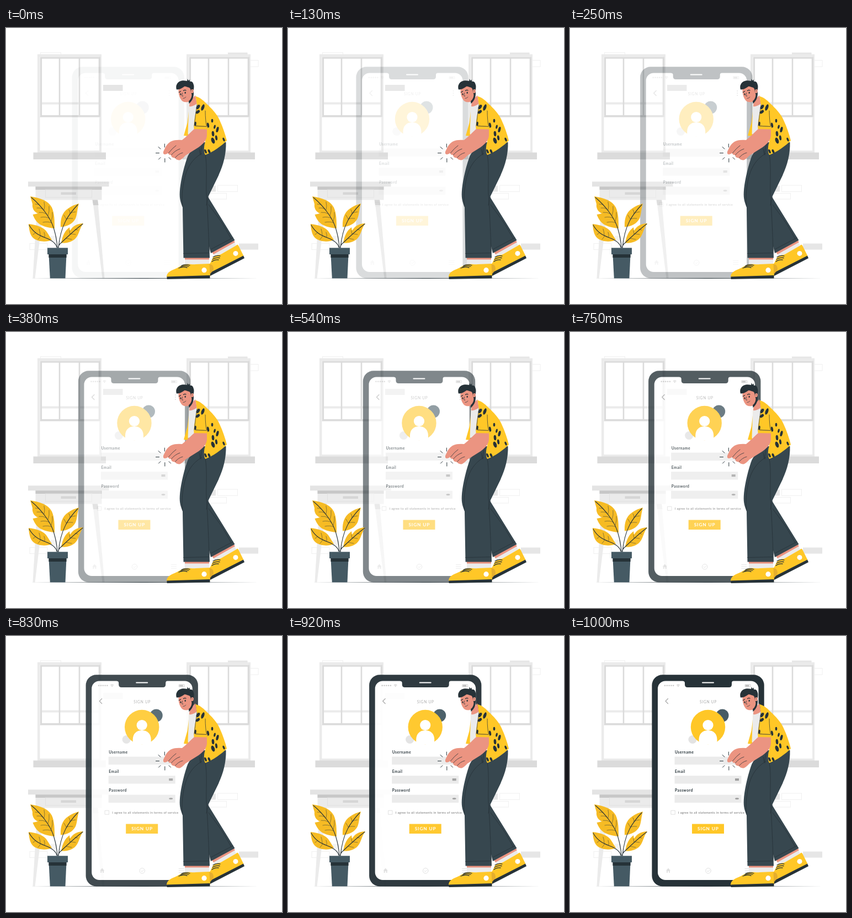
Animation of 500x500 px, one loop 1040 ms. Source, as an HTML page with a canvas:

```html
<!DOCTYPE html>
<html lang="en">
<head>
<meta charset="utf-8">
<title>Sign up</title>
<style>
html, body { margin: 0; width: 100%; height: 100%; overflow: hidden; background: #fff; }
canvas { display: block; width: 500px; height: 500px; }
</style>
</head>
<body>
<canvas id="stage" width="500" height="500"></canvas>
<script>
const LOOP = 1040, STEPS = 24, SLIDE = 30;
const DARK = '#263238', SLATE = '#37474f', BLUE = '#455a64';
const YELLOW = '#ffc727', LEAF = '#f6bb24', SKIN = '#eb9481';
const PALE = '#ebebeb', GREY = '#dbdbdb', MIST = '#e6e6e6';
const FONT = 'Lato, "Open Sans", sans-serif';

const screen = document.getElementById('stage').getContext('2d');
const layer = () => {
  const c = document.createElement('canvas');
  c.width = c.height = 500;
  return c.getContext('2d');
};
const back = layer(), phone = layer(), front = layer();
let g = back;

function fill(d, color) {
  g.fillStyle = color;
  g.fill(new Path2D(d));
}
function line(d, color = DARK, width = 0.8) {
  g.strokeStyle = color;
  g.lineWidth = width;
  g.lineCap = g.lineJoin = 'round';
  g.stroke(new Path2D(d));
}
function box(x, y, w, h, color) {
  g.fillStyle = color;
  g.fillRect(x, y, w, h);
}
function frame(x, y, w, h, color, width = 1) {
  g.strokeStyle = color;
  g.lineWidth = width;
  g.strokeRect(x, y, w, h);
}
function oval(x, y, rx, ry, color, turn = 0) {
  g.fillStyle = color;
  g.beginPath();
  g.ellipse(x, y, rx, ry, turn, 0, Math.PI * 2);
  g.fill();
}
const dot = (x, y, r, color) => oval(x, y, r, r, color);
function round(x, y, w, h, r, color) {
  g.fillStyle = color;
  g.beginPath();
  g.roundRect(x, y, w, h, r);
  g.fill();
}
function label(str, x, y, font, gap, color) {
  g.font = font + ' ' + FONT;
  g.letterSpacing = gap + 'px';
  g.fillStyle = color;
  g.fillText(str, x, y);
}

function drawWindow(x) {
  g.save();
  g.translate(x, 0);
  box(57, 47.5, 116, 179, PALE);
  box(61.5, 52, 107.5, 108, '#fff');
  box(61.5, 162, 107.5, 60, '#fff');
  box(64, 134.5, 104, 4, PALE);
  frame(63.5, 54, 105.8, 105.5, GREY, 3.2);
  for (const bar of [97, 133]) box(bar - 1.3, 54, 2.6, 105, GREY);
  box(49.5, 225.5, 131.5, 12.5, GREY);
  g.restore();
}

function drawDesk() {
  fill('M57 311H70L52.5 453.5H48.5Z', PALE);
  fill('M157 311H166L178.5 453.5H174.5Z', PALE);
  fill('M57 311H70L69 321H56Z', '#d2d2d2');
  fill('M156.5 311H166L167.5 321H158Z', '#cfcfcf');
  box(53.5, 287, 120, 24.5, PALE);
  box(53.5, 287, 120, 6, '#c7c7c7');
  frame(71.5, 293, 84, 14, '#e0e0e0');
  box(99.5, 297.5, 27.5, 4.5, '#d6d6d6');
  box(40, 278.3, 146.5, 9, '#e4e4e4');
}

function drawRoom() {
  const edge = '#f0f0f0';
  frame(62.5, 44.5, 37, 5, edge);
  box(402, 44.5, 35.5, 5, MIST);
  frame(442, 58.5, 15, 11.5, edge);
  box(370, 285.5, 10, 11, MIST);
  frame(383.5, 285, 36, 11.5, edge);
  frame(366, 299.5, 33.5, 10.5, edge);
  box(422, 390.5, 35, 11, MIST);
  frame(43, 390.5, 32, 11, edge);
  box(81, 376.5, 12, 11, '#f3f3f3');
  drawWindow(0);
  drawWindow(270);
  box(176, 103, 35.5, 11, '#e4e4e4');
  drawDesk();
}

function drawForm() {
  label('SIGN UP', 235, 122.4, '6.6px', 0.75, '#a9a9a9');
  dot(276, 144, 11.5, BLUE);
  dot(222, 187.5, 7.6, '#e3e3e3');
  dot(250, 165, 31.2, YELLOW);
  dot(250, 161.5, 9.6, '#fff');
  fill('M233.5 195V188C233.5 177 240 171 250 171S266.5 177 266.5 188V195Q250 198 233.5 195Z', '#fff');

  ['Username', 'Email', 'Password'].forEach((name, i) => {
    const y = 213.3 + i * 34.5;
    label(name, 190, y, 'bold 6.8px', 0.45, DARK);
    box(189.5, y + 5.3, 121, 14.4, PALE);
  });
  box(299, 258, 7, 4.2, '#a0a0a0');
  oval(302.5, 294.6, 3.5, 1.6, '#a0a0a0');

  frame(183.3, 316.2, 7, 7, '#d8d8d8', 0.8);
  label('I agree to all statements in terms of service', 196, 322, '5.6px', 0.34, '#6c6c6c');
  box(221, 340.5, 58, 17.5, YELLOW);
  label('SIGN UP', 231, 352.4, 'bold 8.3px', 0.85, '#fff');
}

function drawPhone(shift) {
  g = phone;
  g.clearRect(0, 0, 500, 500);
  g.save();
  g.translate(shift, 0);
  round(148.4, 70.3, 203.3, 383.2, 19, DARK);
  round(159, 81.5, 182.5, 360.5, 14, '#fff');
  fill('M204 81H296Q293 82 293 85V88Q293 93 288 93H213Q208 93 208 88V85Q208 82 204 81Z', DARK);
  line('M240 84.6H260', '#fff', 2);

  for (let i = 0; i < 5; i++) dot(172 + i * 3.8, 89.8, 1.3, '#c9c9c9');
  line('M193.5 88.8Q196 86.8 198.5 88.8M194.8 90.3Q196 89.4 197.2 90.3', '#bdbdbd', 0.9);
  dot(196, 91.5, 0.6, '#bdbdbd');
  frame(317.5, 88, 9.5, 4, '#bdbdbd', 0.7);
  box(318, 88.5, 6.5, 3, '#bdbdbd');
  line('M177.5 113.5L173 118L177.5 122.5', '#a6a6a6', 1.2);
  for (let i = 0; i < 3; i++) dot(324.5, 114 + i * 4, 0.9, '#aaa');
  drawForm();

  fill('M174 425L178 420.5L182 425H181V429H179V426H177V429H175V425Z', '#e0e0e0');
  g.strokeStyle = '#e0e0e0';
  g.lineWidth = 1;
  g.beginPath();
  g.arc(250.5, 425.3, 4.8, 0, Math.PI * 2);
  g.stroke();
  line('M248.2 425.3L250 427L253 424', '#e0e0e0', 1);
  line('M317 421.5H326M317 425H326M317 428.5H326', '#e0e0e0', 1.2);
  g.restore();
}

function drawPlant() {
  fill('M44 305C61 308 76 312 83 325C88 336 88 350 88 363C76 362 62 359 55 350C52 346 50 342 48.5 338L58 336C51 333 47 327 48 319Z', LEAF);
  fill('M132 318C118 322 105 329 101 342C98.5 350 99 356 99 360.5C110 360 121 355 126 345C129 338 129 328 132 318Z', LEAF);
  fill('M41 355C55 357 69 360 75 371C78 376 81 380 83 384C74 388 59 388 50 381C44 376 42 368 41 355Z', LEAF);
  fill('M140 354C129 354 121 359 116 367L115 361C107 367 102 376 100 389.5C112 390 123 387 129 377C133 370 134 362 140 354Z', LEAF);
  line('M46 307C64 322 81 344 86.5 363Q92 381 93 398M130 320C113 338 99 357 95 398M42 357C53 377 70 378 80 384Q90 389 92.5 398M139 355C124 366 112 378 100 389Q95 393 94.5 398', DARK, 1.1);
  line('M60 320Q57 319 53 319M67 328Q62 325 56 326M74 337Q67 333 60 334M79 345Q72 341 63 343M83 353Q76 350 67 352M69 330Q71 323 69 315M76 340Q79 332 78 323M82 350Q85 342 84 334M116 336Q116 332 114 329M109 346Q107 342 105 339M109 346Q115 344 121 345M116 336Q121 333 126 333M54 370Q52 373 49 374M63 376Q61 380 58 383M62 376Q62 370 60 364M70 379Q71 375 69 370M125 365L130 366M116 373Q121 373 126 374M109 381Q114 382 119 383M116 373Q115 370 115 367', DARK, 0.5);
  fill('M77.5 410H109.5L107.5 453.5H79.8Z', BLUE);
  box(77.5, 409, 32, 7, DARK);
  box(75, 398.3, 37, 11.7, BLUE);
}

function drawLegs() {
  // far leg and shoe
  fill('M374 407L413 386L417 394L379 416Z', PALE);
  fill('M372 405L412 384L415 388L376 410Z', SKIN);
  fill('M368 445V428C372 425 373 417 377 414C381 411 386 412 391 409L417 394Q419 391 421 394L430.5 413L369 447Z', YELLOW);
  fill('M368 444L430 412.5L432 417L369 449.5Z', DARK);
  dot(416, 408.4, 4.5, '#fff');
  line('M375 415Q381 411 388 413M374 419Q380 415 387 416.5M373 423Q378 419 385 420', DARK, 1.3);
  fill('M360 207H398.5C399 228 394 248 385 267L366 306L414.5 384.5L371 408L352 330Z', SLATE);

  // near leg and shoe
  box(324, 418, 44, 11, PALE);
  box(324, 415, 44, 4.5, SKIN);
  fill('M291 451C291 444 297 440 305 437C313 434 318 429 325 428C332 427 337 429 344 428L369 427L370 450Z', YELLOW);
  fill('M368.5 428Q376 427 376 438L369.5 446Z', '#e5ae2d');
  fill('M291.5 450.5L369.5 448V453.5L291.5 455Z', DARK);
  dot(359, 438.7, 4.6, '#fff');
  line('M318 430.5Q325 427 333 430M316 433Q323 429.5 331 432M313 435Q320 432 328 434', DARK, 1.3);
  fill('M358 207C344 215 332 222 327.5 237C321 256 315.5 282 314.8 297C314 310 317 317 320 325L321.5 416.5H369L366 306L385 267L398 208Z', SLATE);
  line('M355 227C338 237 328 251 322.5 276C319 294 318 309 320 323M361 229C365 250 362 283 363 300Q366 340 368 405M366.5 306L363 321M367 320C375 331 390 350 396 361L408 382M371 401L411 380M321.5 408.5L368 407.5M357 209Q352 220 353 230M352 229L350 219', DARK, 0.8);
}

function drawTorso() {
  fill('M332 138Q331 156 328.5 172L322 195L330 196Z', YELLOW);
  fill('M331.5 137L346 137L343 189L329.5 192Z', PALE);
  fill('M333 132L343 122L346 137Q338 143 332 142Z', SKIN);
  fill('M343.5 123.5Q354 127 362 136C373 146 383 157 387 167C393 180 397 192 400 204C391 213 375 225 361 230C358 225 358 215 361 206L363 183L340.5 182C340 168 344 153 346 140Z', YELLOW);
  const spots = [
    [348, 143, 2.6, 4.5, 0.6], [356.5, 144, 2.6, 6, 0.35], [347.5, 152, 2.5, 4.2, 0.9],
    [343, 173.5, 1.7, 3.8, 0.1], [366, 176, 2, 4.6, -0.2], [373.5, 168, 1.8, 3.2, 0],
    [378, 179, 1.7, 3.6, 0.2], [383, 184, 2.2, 5.2, 0.25], [375, 191.5, 2.3, 4.7, -0.1],
    [381, 199, 2, 4.5, -0.15], [375, 204, 3, 5.7, -0.35], [394.5, 202, 1.7, 3.6, -0.4],
    [361.5, 223.5, 1.8, 4, -0.4], [368, 223.5, 2, 3.8, -0.4]
  ];
  for (const [x, y, rx, ry, turn] of spots) oval(x, y, rx, ry, DARK, turn);
  line('M361 150Q361 168 364 181M343 177L363 178.5M346 139Q343 157 341 178', DARK, 0.7);
}

function drawArm() {
  fill('M342 182C335 188 327 197 319 203Q307 202 300 205C293 208 289 215 287 220C285 223 284 227 286 228.5Q289 230 294 226.5Q294 230 299 230Q299 235 306 235.5Q308 239 314 239.5Q319 238 325 231L349 216C358 209 363 204 364 195V182.5Z', SKIN);
  line('M308 213Q302 217 294.5 226.5M315 219Q306 222 299.5 230M320 226Q312 228 306.5 235', DARK, 0.75);
  fill('M341 177L364 178V183.5L340.5 183Z', YELLOW);
  line('M343 177.7L363 178.5', DARK, 0.7);
  line('M287.3 210V216M276 215.5L280 219M271.5 226.5H277.5M276.5 238L280 234.5M287.8 236.5V243M295 234.5L298.5 238', DARK, 1);
}

function drawHead() {
  fill('M312.5 110C312 120 315 128 319 132C323 135.5 331 135 335 131L340 119L338 105L320 102Z', SKIN);
  fill('M331.5 137C336 133 340 128 340 118L338 109L335 111L336.5 121Q336.5 128 331 132.5Z', DARK);
  fill('M309 111.5Q307 106 310 101C314 95 321 94.5 328 96Q329 94 328.5 92L331 95.5L333 93.2V97Q337 96 339 100Q342 107 339 114L336.5 120L334.5 115Q335 110 332 108C327 107 325 105 323 106Q316 111.5 309 111.5Z', DARK);
  oval(337.3, 114.5, 2.6, 3.6, SKIN, 0.2);
  line('M336.3 114Q338 112.5 338.5 114', DARK, 0.5);
  line('M313.5 116.5L316.5 114.8M321.5 113.5Q324 111.7 326 113', DARK, 1.3);
  oval(316.4, 120, 1.1, 1.7, DARK);
  oval(324.7, 117.3, 1.1, 1.7, DARK);
  line('M319.8 117.5Q318 122 319.2 123.5L321 123M321 127.5Q324 127.5 326 125', DARK, 0.7);
}

function drawFront() {
  g = front;
  fill('M43 453.5L250 453L457 453.5L250 454Z', DARK);
  drawPlant();
  drawLegs();
  drawTorso();
  drawArm();
  drawHead();
}

drawRoom();
drawFront();

function render(now) {
  const t = now % LOOP;
  // whole steps on a clock of 10 ms ticks
  const step = Math.min(STEPS, Math.floor((Math.floor(t / 10) * 10 + 4.9) * STEPS / 1000));
  const part = Math.min(1, 0.04 + step / STEPS);
  drawPhone(SLIDE * (part - 1));
  screen.fillStyle = '#fff';
  screen.fillRect(0, 0, 500, 500);
  screen.drawImage(back.canvas, 0, 0);
  screen.globalAlpha = part;
  screen.drawImage(phone.canvas, 0, 0);
  screen.globalAlpha = 1;
  screen.drawImage(front.canvas, 0, 0);
}

const start = performance.now();
function tick() {
  render(performance.now() - start);
  requestAnimationFrame(tick);
}
tick();
</script>
</body>
</html>
```
